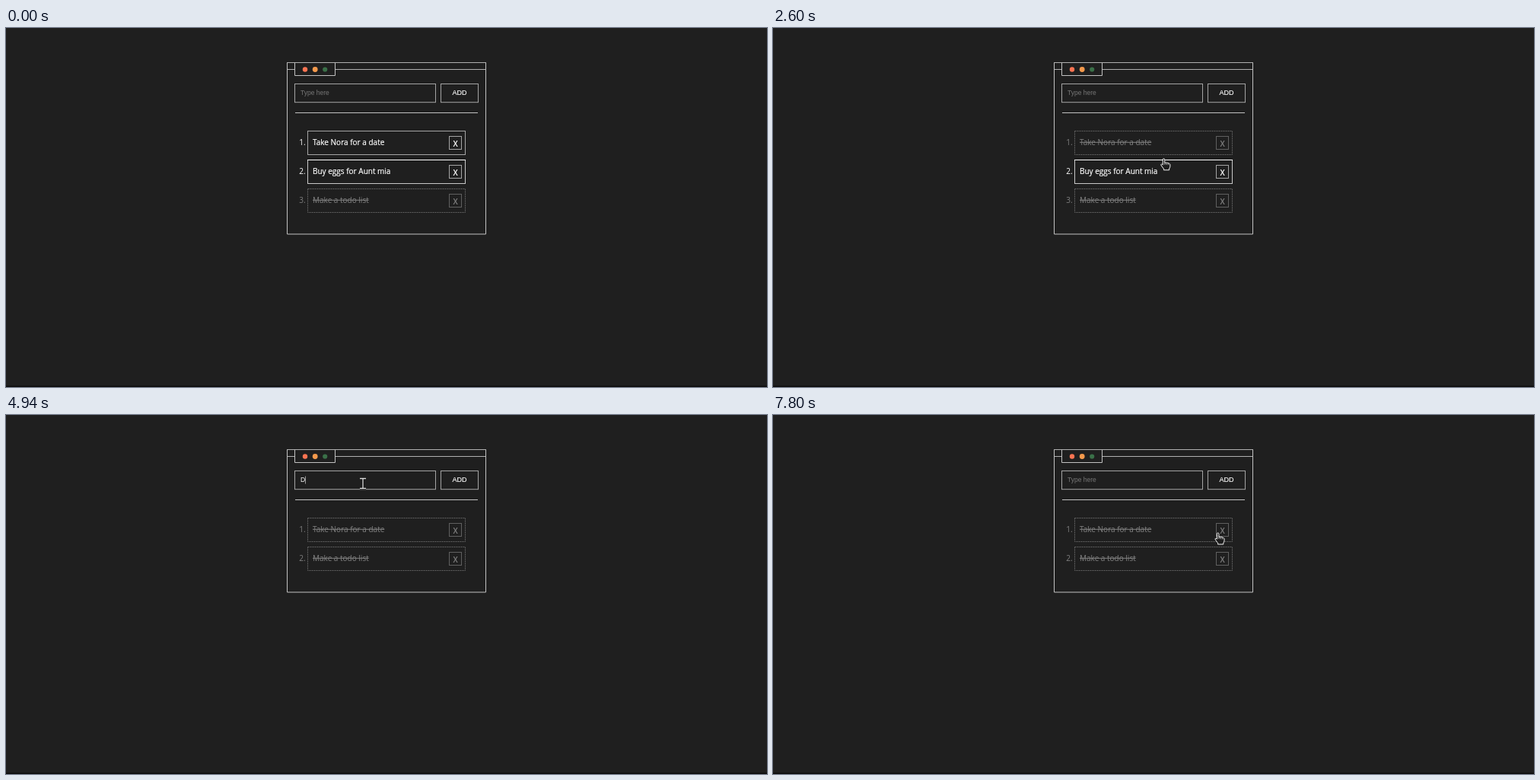
Recreate the animation shown at these times as an HTML page. Size 1000 by 472 pixels, loop 8 s.

```html
<!DOCTYPE html>
<html lang="en">
<head>
<meta charset="utf-8">
<title>Todo list</title>
<style>
  html, body { margin: 0; width: 100%; height: 100%; overflow: hidden; background: #1f1f1f; }
  svg { display: block; width: 1000px; height: 472px; }
  text { fill: #fff; font: 10px "Open Sans", "Noto Sans", sans-serif; }
  .ui { font: 8.5px "Liberation Sans", Arial, sans-serif; }
  .add { font-size: 9px; text-anchor: middle; stroke: #fff; stroke-width: .15; }
  .line { fill: none; stroke: #a4a4a4; }
  .frame { stroke: #c2c2c2; }
  .top { stroke: #b0b0b0; }
  .hint { fill: #777; }
  .num { text-anchor: end; }
  .label { stroke: #fff; stroke-width: .2; }
  .cross { font-weight: 600; text-anchor: middle; }
  .item .box { stroke: #c8c8c8; }
  .item .edge { stroke: #fff; }
  .item.first .line { stroke: #a4a4a4; }
  .item.done .line { stroke: #606060; }
  .done .box { stroke-dasharray: 2 1; }
  .done .edge { display: none; }
  .done text { fill: #808080; }
  .done .label { text-decoration: line-through; stroke: none; }
  .cursor { fill: #1c1c1c; stroke: #f4f4f4; stroke-linejoin: round; }
  #arrow { fill: #fff; stroke: #111; }
</style>
</head>
<body>
<svg viewBox="0 0 1000 472">
  <rect width="1000" height="472" fill="#1f1f1f"/>
  <rect y="470.5" width="1000" height="1.5" fill="#0c0c0c"/>

  <path id="sides" class="line frame"/>
  <path class="line top" d="M369 45.5H631M370 54.5H379M433 54.5H630"/>
  <path class="line frame" d="M379.5 46V62.5H432.5V46"/>
  <circle cx="393" cy="54.5" r="3.2" fill="#fb7452"/>
  <circle cx="406.2" cy="54.5" r="3.4" fill="#f5994c"/>
  <circle cx="419.2" cy="54.5" r="3.1" fill="#3a7048"/>

  <rect class="line" x="379.5" y="73.5" width="185" height="24.2"/>
  <text id="field" class="ui" x="387" y="88.4"></text>
  <rect id="caret" y="80.5" width=".8" height="10" fill="#bbb"/>
  <rect class="line" x="571.5" y="73.5" width="49" height="24.2"/>
  <text class="ui add" x="596" y="88.4">ADD</text>
  <path class="line frame" d="M380 111.5H620"/>

  <g id="list"></g>

  <g id="hand" class="cursor">
    <path d="M-1.6 1.3Q-1.6 0-.4 0T.9 1.3V5.2L2.8 5.5Q3.4 5 4 5.3L4.9 5.8Q6 5.5 6.3 6.3L7.3 6.7Q8 7 8 8V10.5Q7.6 12.4 6.8 13.2V15H-.4V13.4L-3.6 9.2Q-4.6 7.6-3.4 7.2Q-2.4 7-1.6 8.2Z"/>
    <path d="M.9 5V8M3.1 5.8V8.2M5.4 6.2V8.4" stroke-width=".7"/>
  </g>
  <g id="beam" fill="none">
    <path d="M-4-6.5H4M-4 6.5H4M0-6.5V6.5" stroke="#0c0c0c" stroke-width="3"/>
    <path d="M-4-6.5H4M-4 6.5H4M0-6.5V6.5" stroke="#ddd" stroke-width="1.3"/>
  </g>
  <path id="arrow" class="cursor" d="M0 0V12L2.7 9.5 4.6 13.6 6.4 12.8 4.6 8.8H8.4Z"/>
</svg>
<script>
const LOOP = 8000, STEP = 130, ROW = 38;
const $ = id => document.getElementById(id);
const between = (t, a, b) => t >= a && t < b;

// Each entry lives from `born` to `gone` and is crossed out at `done`.
const items = [
  { label: "Discover", born: 6240, gone: 7670, done: LOOP },
  { label: "Take Nora for a date", born: 0, gone: LOOP, done: 1170 },
  { label: "Buy eggs for Aunt mia", born: 0, gone: 3380, done: LOOP },
  { label: "Make a todo list", born: 0, gone: LOOP, done: 0 }
];

// Pointer path: time, x, y
const path = [
  [130, 640, 330], [520, 450, 175], [910, 470, 154], [1430, 470, 154],
  [1560, 477, 156], [1820, 500, 168], [1950, 500, 168], [2080, 505, 170],
  [2470, 505, 170], [3120, 590, 187], [3380, 590, 187], [3900, 469, 90],
  [7020, 469, 90], [7670, 585, 155], [LOOP, 585, 155]
];

// Typing: time, letters shown
const word = "Discover";
const keys = [[4940, 1], [5200, 2], [5330, 4], [5590, 5], [5720, 6], [5980, 7], [6110, 8], [6240, 0]];

for (const it of items) {
  const g = document.createElementNS("http://www.w3.org/2000/svg", "g");
  g.innerHTML = `<text class="num" x="393.6" y="154"></text>
    <rect class="line box" x="396.5" y="135.5" width="207" height="31"/>
    <path class="line edge" d="M396 135.5H604"/>
    <text class="label" x="403" y="154">${it.label}</text>
    <rect class="line" x="582.5" y="142.5" width="16" height="17"/>
    <text class="cross" x="590.7" y="155.6">X</text>`;
  it.node = $("list").appendChild(g);
}

function pointer(t) {
  const i = Math.max(1, path.findIndex(p => p[0] > t));
  const [t0, x0, y0] = path[i - 1], [t1, x1, y1] = path[i];
  const k = (t - t0) / (t1 - t0), e = k * k * (3 - 2 * k);
  return [x0 + (x1 - x0) * e, y0 + (y1 - y0) * e];
}

function drawList(t) {
  let row = 0;
  for (const { node, born, gone, done } of items) {
    const live = between(t, born, gone);
    node.style.display = live ? "" : "none";
    if (!live) continue;
    node.setAttribute("class", "item" + (t >= done ? " done" : "") + (row ? "" : " first"));
    node.setAttribute("transform", `translate(0 ${row * ROW})`);
    node.firstChild.textContent = ++row + ".";
  }
  $("sides").setAttribute("d", `M369.5 46V${157 + row * ROW}H630.5V46`);
  return row;
}

function drawField(t) {
  const count = keys.reduce((n, [at, len]) => t >= at ? len : n, 0);
  const field = $("field");
  field.textContent = count ? word.slice(0, count) : "Type here";
  field.classList.toggle("hint", !count);
  const on = between(t, 3900, 4550) || between(t, 4940, 6760) || between(t, 7280, 7670);
  $("caret").style.display = on ? "" : "none";
  $("caret").setAttribute("x", 387 + (count ? field.getComputedTextLength() : 0));
}

function drawPointer(t, rows) {
  const [x, y] = pointer(t);
  const shown = t >= 130 && !between(t, 5200, 7150);
  const inField = x > 379 && x < 565 && y > 73 && y < 98;
  const inItem = x > 396 && x < 604 && y > 135 && y < 135 + rows * ROW;
  const shape = inField ? "beam" : inItem ? "hand" : "arrow";
  for (const id of ["hand", "beam", "arrow"]) {
    $(id).style.display = shown && id === shape ? "" : "none";
    $(id).setAttribute("transform", `translate(${x} ${y})`);
  }
}

function draw() {
  const t = Math.floor(performance.now() % LOOP / STEP) * STEP;
  const rows = drawList(t);
  drawField(t);
  drawPointer(t, rows);
  requestAnimationFrame(draw);
}
draw();
</script>
</body>
</html>
```
